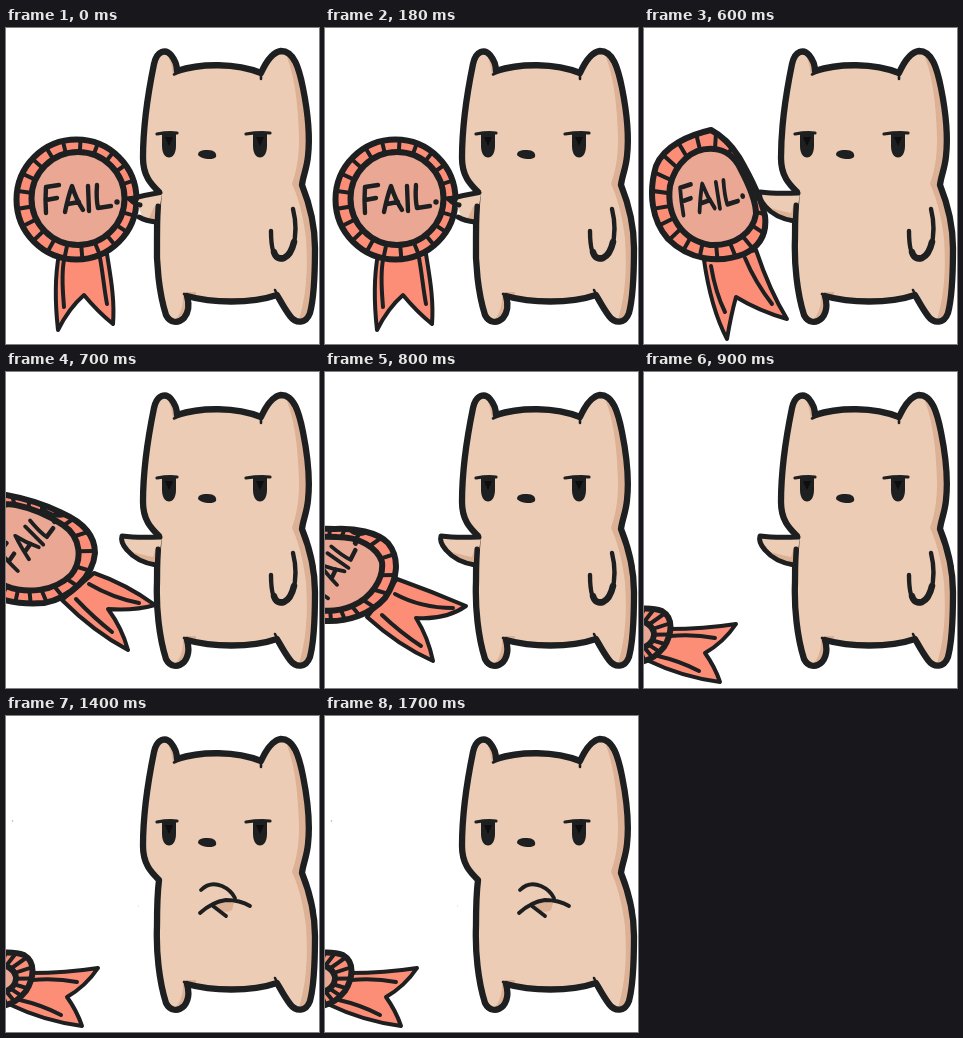
Animation of 313 by 316 pixels, one loop 1900 ms. Source, as an HTML page:

```html
<!DOCTYPE html>
<html lang="en">
<head>
<meta charset="utf-8">
<title>Fail badge</title>
<style>
html, body { margin: 0; width: 100%; height: 100%; overflow: hidden; background: #fff; }
svg { display: block; width: 100%; height: 100%; }
</style>
</head>
<body>
<svg id="stage" viewBox="0 0 313 316" fill="none" stroke-linecap="round" stroke-linejoin="round"></svg>
<script>
const INK = '#1e1f21', SKIN = '#ecccb4', SHADE = '#dcb195';
const CORAL = '#fc8e77', PINK = '#eaa894';
const LOOP = 1900, TICKS = 21;

const line = (d, w = 4, c = INK) => `<path d="${d}" stroke="${c}" stroke-width="${w}"/>`;
const fill = (d, c) => `<path d="${d}" fill="${c}"/>`;
const shape = (d, c, w) => `<path d="${d}" fill="${c}" stroke="${INK}" stroke-width="${w}"/>`;
const circle = (x, y, r) => `M${x - r} ${y}a${r} ${r} 0 1 1 ${2 * r} 0a${r} ${r} 0 1 1 ${-2 * r} 0Z`;
const group = (id, content) => `<g id="${id}">${content}</g>`;

// Lettering around its own centre
const letters = `<g role="img" aria-label="FAIL.">` +
  line('M-32 -12Q-33 0 -32 14M-32 -12L-19 -14M-32 1L-21 -1' +
       'M-13 13Q-10 -2 -6 -13Q-2 0 5 11M-10 5L1 3' +
       'M10 -13L11 12M19 -14Q18 0 20 9L33 7', 4.4) +
  `<circle cx="39" cy="3" r="2.7" fill="${INK}"/></g>`;

function badge(id, p) {
  const [cx, cy] = p.hub;
  let rays = '';
  for (let i = 0; i < TICKS; i++) {
    const a = (i + 0.2) * 2 * Math.PI / TICKS - Math.PI / 2;
    rays += `M${cx} ${cy}l${(90 * Math.cos(a)).toFixed(1)} ${(90 * Math.sin(a)).toFixed(1)}`;
  }
  return group(id,
    shape(p.tail, CORAL, 4) + line(p.folds, 4) +
    `<clipPath id="${id}Clip"><path d="${p.rim}"/></clipPath>` +
    fill(p.rim, CORAL) +
    `<g clip-path="url(#${id}Clip)">${line(rays, 4)}</g>` +
    line(p.rim, 6) + shape(p.face, PINK, 6) +
    (p.word ? `<g transform="${p.word}">${letters}</g>` : '') +
    (p.nick ? line(p.nick, 4) : ''));
}

const badges = {
  held: {
    hub: [71, 171], rim: circle(70.5, 171.5, 60), face: circle(72, 170.5, 46.5),
    tail: 'M53 226C49 248 49 275 52 302Q63 280 78 267Q91 283 107 296C109 270 104 246 101 226Z',
    folds: 'M58 232C55 248 57 265 58 279M94 230C97 246 98 260 101 276',
    word: 'translate(72 171)'
  },
  slip: {
    hub: [68, 171],
    rim: 'M67 102C45 107 20 118 12 138C4 165 8 193 24 211C45 232 75 236 100 226C117 218 123 205 121 188C117 170 106 148 95 129C88 118 80 109 67 102Z',
    face: 'M70 121C48 119 31 136 26 158C22 188 38 212 66 217C92 218 109 204 112 186C112 172 104 155 96 140C90 128 82 122 70 121Z',
    tail: 'M60 232C64 260 72 290 83 311Q87 287 92 269Q115 283 143 291C130 270 120 246 112 222Z',
    folds: 'M67 238C70 256 75 272 81 284M101 230Q111 254 128 276',
    word: 'translate(65 169) rotate(-7) scale(.86 1.06)'
  },
  drift: {
    hub: [20, 180],
    rim: 'M-45 160C-35 125 -15 120 0 123C22 127 42 134 56 141C74 149 89 162 89 181C87 204 65 226 38 231C10 233 -10 228 -30 215Z',
    face: 'M-30 165C-20 130 0 131 10 133C30 137 45 145 57 153C75 165 77 188 65 203C48 220 20 222 0 214C-20 205 -30 190 -30 165Z',
    tail: 'M56 228Q88 260 122 278Q116 256 102 237Q128 239 149 233Q120 212 88 201Z',
    folds: 'M70 227Q88 246 106 260M83 212Q107 226 133 231',
    word: 'translate(22 170) rotate(-43) scale(.85 1)',
    nick: 'M36 136Q46 146 59 143'
  },
  fall: {
    hub: [2, 204],
    rim: 'M-60 185C-40 155 -10 156 10 157C30 156 52 160 63 171C75 186 73 207 60 226C45 243 22 250 0 249C-25 248 -50 230 -60 185Z',
    face: 'M-45 185C-30 164 -10 164 12 165C34 165 52 175 57 190C59 207 46 226 27 234C12 240 -4 240 -18 235C-36 225 -44 205 -45 185Z',
    tail: 'M42 245Q74 274 108 289Q103 265 91 246Q121 248 141 234Q108 220 72 207Z',
    folds: 'M57 243Q76 261 96 274M70 222Q96 236 128 236',
    word: 'translate(8 196) rotate(-53) scale(.85 1)',
    nick: 'M25 158Q33 165 42 160'
  },
  landed: {
    hub: [-10, 263],
    rim: 'M-20 240C-5 235 10 236 18 239C30 246 28 262 20 275C12 285 2 291 -10 290Z',
    face: 'M-14 249C1 247 10 254 10 263C9 271 3 277 -14 278Z',
    tail: 'M24 257Q60 257 92 252Q80 270 61 281Q71 295 76 310Q38 305 5 289Z',
    folds: 'M26 264Q50 262 71 266M14 284Q36 289 55 299'
  }
};

const BODY = 'M153 164C145 156 137 148 137 130C137 105 141 70 148 36' +
  'C151 22 160 21 165 27C170 33 171 39 171 43C195 35 230 35 255 45' +
  'C260 34 266 24 275 23C288 23 293 40 297 60C302 85 304 110 302 128' +
  'C301 140 297 148 296 157C302 172 309 195 309 220C309 250 308 270 304 285' +
  'C300 296 290 296 284 288C278 280 274 272 271 267C245 276 205 275 181 268' +
  'C183 275 183 284 178 290C172 296 164 295 160 287C153 265 150 235 151 210' +
  'C151 195 151 180 153 164Z';

const body = `<clipPath id="bodyClip"><path d="${BODY}"/></clipPath>` +
  fill(BODY, SKIN) +
  `<g clip-path="url(#bodyClip)">` +
  fill('M277 20C288 42 292 72 293 110C293 135 289 147 286 156C291 166 297 185 300 210C302 240 301 268 291 298L316 300L316 20Z', SHADE) +
  fill('M159 22C164 30 166 38 167 48L175 44L168 22Z', SHADE) +
  fill('M177 264C178 280 173 290 164 297L190 297V264Z', SHADE) +
  `</g>` + line(BODY, 6.3) +
  line('M168 46.5L178 42M255 45L255 51M178 266L186 269M272 268L269 262', 2.6) +
  fill('M192 127C192 122 198 122 202 122C208 122 211 125 210 129C208 132 196 132 192 127Z', INK);

const eye = (x, l, r) =>
  fill(`M${x - 7} 106L${x + 7} 105V118C${x + 7} 125 ${x + 4} 129.5 ${x} 129.5C${x - 4} 129.5 ${x - 7} 125 ${x - 7} 118Z`, INK) +
  fill(`M${x - 4} 109h8l-4 9Z`, '#0d0d0e') +
  line(`M${l} 106Q${x - 1} 104 ${r} 105`, 3.2);

const shut = x => fill(`M${x} 115Q${x + 8} 109 ${x + 17} 110Q${x + 28} 111 ${x + 32} 116Q${x + 16} 119 ${x} 115Z`, INK);

const gripArm =
  fill('M156 166L134 169L131 176L136 188L152 193L154 178Z', SKIN) +
  fill('M148 179L153 176L152 193L143 190Z', SHADE) +
  line('M154 164.5Q139 167 124 171', 5) +
  line('M124 171Q128 176 134 177', 5) +
  line('M133 189Q140 193 150 194', 5) + line('M152 178L151 197', 5);

const openArm =
  fill('M156 166L115 164Q117 173 124 180Q134 190 152 194L154 178Z', SKIN) +
  fill('M121 178Q132 182 147 185L150 176L153 177L152 194Q133 191 121 178Z', SHADE) +
  line('M154 165Q130 166 116 164Q114 170 121 178Q131 190 150 193', 5) +
  line('M152 177L151 198', 5);

const sideArm = line('M287 181Q292 201 287 219Q281 232 273 231Q265 228 265 203', 4.4) +
  line('M268 224Q270 232 278 230Q285 227 288 214', 6.5);

const folded =
  fill('M205 188Q216 180 229 183L226 194Q219 199 207 190Z', SHADE) +
  line('M195 174Q204 165 216 170Q225 174 229 182', 3.8) +
  line('M194 197Q206 186 220 184Q234 184 244 190', 3.8) +
  line('M207 190L220 200', 3.8) +
  `<circle cx="6.5" cy="105" r=".8" fill="#aaa"/><circle cx="132.5" cy="190" r=".6" fill="#ccc"/>`;

const stage = document.getElementById('stage');
stage.innerHTML =
  Object.entries(badges).map(([id, p]) => badge(id, p)).join('') + body +
  group('open', eye(163, 151, 171) + eye(254, 240, 264)) +
  group('shut', shut(146) + shut(240)) +
  group('grip', gripArm) + group('reach', openArm) +
  group('side', sideArm) + group('folded', folded);

const parts = [...stage.querySelectorAll('g[id]')];
const poses = [
  [0, 'held open grip side'],
  [300, 'held shut grip side'],
  [600, 'slip open reach side'],
  [700, 'drift open reach side'],
  [800, 'fall open reach side'],
  [900, 'landed open reach side'],
  [1400, 'landed open folded']
].map(([at, names]) => ({ at, names: names.split(' ') }));

let shown;
function draw(ms) {
  const t = ms % LOOP;
  const pose = poses.filter(p => p.at <= t).pop();
  if (pose === shown) return;
  shown = pose;
  for (const g of parts) g.style.display = pose.names.includes(g.id) ? '' : 'none';
}

const start = performance.now();
function tick() {
  draw(performance.now() - start);
  requestAnimationFrame(tick);
}
tick();
</script>
</body>
</html>
```
